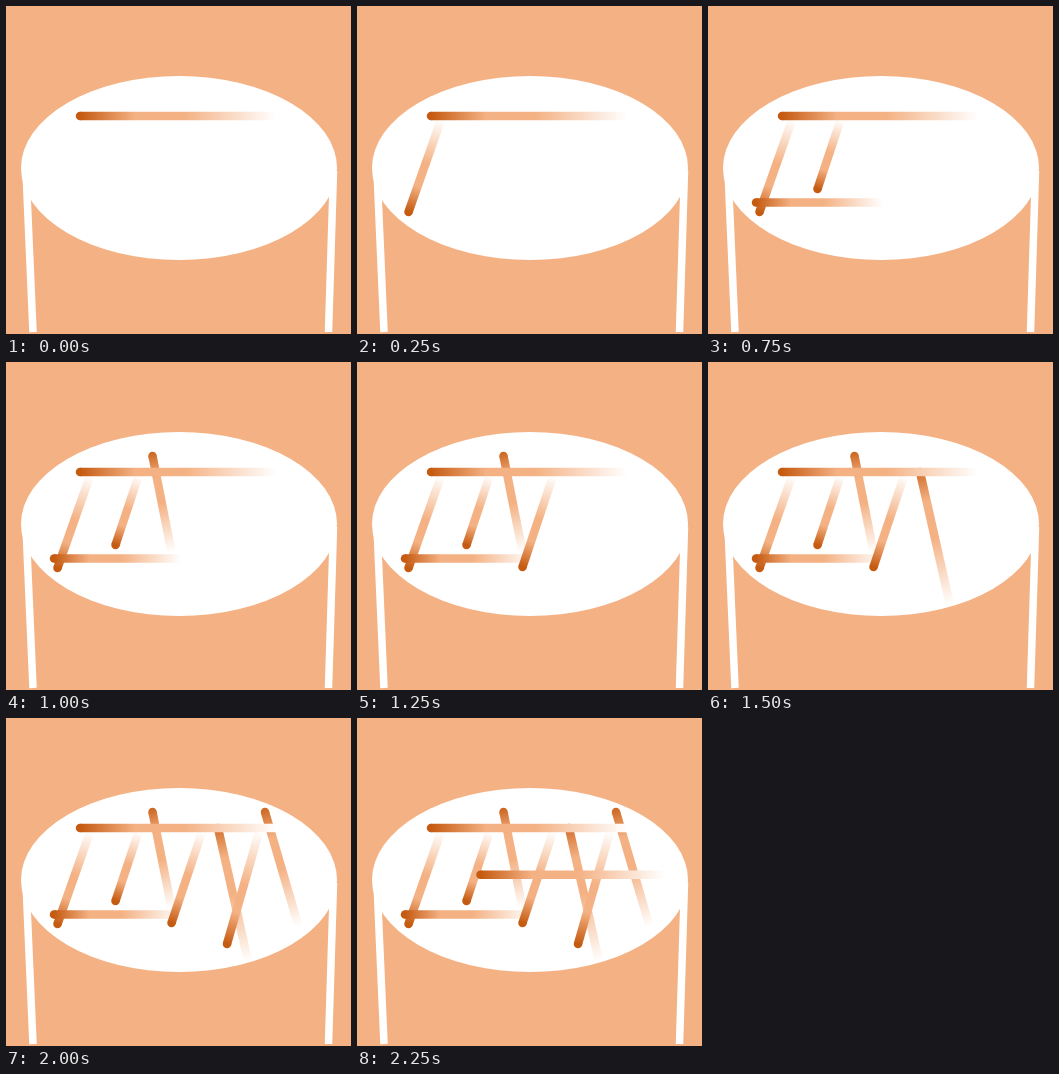
An HTML page with a canvas for the animation above (2500 ms loop, 345 by 328 pixels).

```html
<!DOCTYPE html>
<html lang="en">
<head>
<meta charset="utf-8">
<title>Strokes on a table</title>
<style>
  html, body { margin: 0; width: 100%; height: 100%; overflow: hidden; background: #f4b183; }
  canvas { display: block; }
</style>
</head>
<body>
<canvas id="stage" width="345" height="328"></canvas>
<script>
const ctx = document.getElementById('stage').getContext('2d');
const STEP = 250;
const WIDTH = 8.5;
const BAR_Y = 110;
const PEACH = '#f4b183';

// Every stroke runs from a dark round end to a faded flat end.
const stroke = (x1, y1, x2, y2, lead = 0) => () => {
  // lead: how far before the start the fade begins, as a share of the length
  const fade = ctx.createLinearGradient(x1 - lead * (x2 - x1), y1 - lead * (y2 - y1), x2, y2);
  fade.addColorStop(0, '#c55a11');
  fade.addColorStop(0.28, PEACH);
  fade.addColorStop(0.53, PEACH);
  fade.addColorStop(1, '#fff');
  line(x1, y1, x2, y2, WIDTH, fade);
  disc(x1, y1, WIDTH / 2, WIDTH / 2, fade);
};
const level = (x, y, length) => stroke(x, y, x + length, y);
const rise = (x, y, run) => stroke(x, y, x + run, BAR_Y + 4); // up to the bar
const fall = (x, y, run, drop) => stroke(x, y, x + run, y + drop, 0.08);

const bar = level(74, BAR_Y, 196);
const others = [
  rise(51.5, 206, 32.5),
  level(48, 196.5, 127),
  rise(109.5, 183, 23),
  fall(146.5, 94, 19, 96),
  rise(165.5, 205, 30.5),
  fall(212, BAR_Y, 30, 133),
  rise(221, 226, 32),
  fall(259, 94, 33.5, 114),
  level(123.5, 156.8, 184)
];

function line(x1, y1, x2, y2, width, style) {
  ctx.lineWidth = width;
  ctx.strokeStyle = style;
  ctx.beginPath();
  ctx.moveTo(x1, y1);
  ctx.lineTo(x2, y2);
  ctx.stroke();
}

function disc(x, y, rx, ry, style) {
  ctx.fillStyle = style;
  ctx.beginPath();
  ctx.ellipse(x, y, rx, ry, 0, 0, 2 * Math.PI);
  ctx.fill();
}

function drawTable() {
  ctx.fillStyle = PEACH;
  ctx.fillRect(0, 0, 345, 328);
  disc(173, 162, 158, 92, '#fff');
  line(20, 165, 27, 326, 7.5, '#fff');
  line(327.5, 165, 322.5, 326, 7.5, '#fff');
}

function frame(now) {
  const count = Math.floor(now / STEP) % (others.length + 1);
  drawTable();
  others.slice(0, count).forEach(draw => draw());
  bar(); // covers the others
  requestAnimationFrame(frame);
}
frame(0);
</script>
</body>
</html>
```
